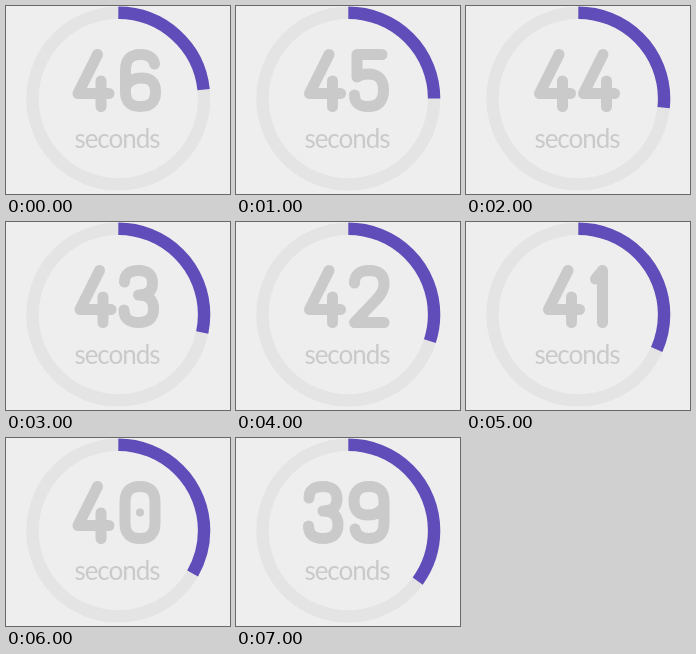
Recreate the animation shown at these times as an HTML page with a canvas. Size 224 by 188 pixels, loop 8000 ms.

```html
<!DOCTYPE html>
<html lang="en">
<head>
<meta charset="utf-8">
<title>Countdown</title>
<style>
  html, body { margin: 0; width: 100%; height: 100%; overflow: hidden; background: #eee; }
  canvas { display: block; }
</style>
</head>
<body>
<canvas id="stage" width="224" height="188" role="img" aria-label="Seconds countdown"></canvas>
<script>
const canvas = document.getElementById('stage');
const ctx = canvas.getContext('2d');

const LOOP = 8000, FIRST = 46;
const CX = 112.3, CY = 92.6, RADIUS = 85.8, RING = 12.4;
const TEXT_CX = 111, TOP = 43, HEIGHT = 63, GAP = 2, PEN = 11;
const INK = '#cacaca', TRACK = '#e4e4e4', ACCENT = '#614dba';

// Rounded numerals: [advance width, centre line of the pen].
const SIX = 'M38 15C37 8 31 5.5 24 5.5Q9 5.5 9 21V43Q9 57.5 24 57.5Q39 57.5 39 43Q39 29 25 29Q13 29 9 38';
const NUMERALS = {
  0: [45, 'M8.5 21Q8.5 5.5 23.5 5.5Q38.5 5.5 38.5 21V42Q38.5 57.5 23.5 57.5Q8.5 57.5 8.5 42Z'],
  1: [24, 'M8.5 14L15.5 5.5V57.5'],
  2: [42, 'M6.5 18Q6.5 5.5 21.5 5.5Q36 5.5 36 19Q36 27 28 35L6.5 57.5H36'],
  3: [41, 'M6 17Q6 5.5 20 5.5Q34 5.5 34 18Q34 30 20 30Q35 30 35 44Q35 57.5 20 57.5Q5.5 57.5 5.5 45'],
  4: [42, 'M25 5.5L5.5 44.5H36.5M28.5 32V57.5'],
  5: [42, 'M34 5.5H9V28Q13 25 20 25Q35.5 25 35.5 41Q35.5 57.5 20 57.5Q6.5 57.5 6.5 46'],
  6: [45, SIX],
  9: [45, SIX, true]
};

function ring(color, turn) {
  const start = -Math.PI / 2;
  ctx.beginPath();
  ctx.arc(CX, CY, RADIUS, start, start + turn * 2 * Math.PI);
  ctx.lineWidth = RING;
  ctx.lineCap = 'butt';
  ctx.strokeStyle = color;
  ctx.stroke();
}

function numeral(digit, x) {
  const [width, path, flipped] = NUMERALS[digit];
  ctx.save();
  ctx.translate(x, TOP);
  if (flipped) {
    ctx.translate(width + GAP, HEIGHT);
    ctx.rotate(Math.PI);
  }
  ctx.lineWidth = PEN;
  ctx.lineCap = ctx.lineJoin = 'round';
  ctx.strokeStyle = ctx.fillStyle = INK;
  ctx.stroke(new Path2D(path));
  if (digit === '0') {
    ctx.beginPath();
    ctx.arc(23.5, HEIGHT / 2, 4, 0, 2 * Math.PI);
    ctx.fill();
  }
  ctx.restore();
}

function drawNumber(value) {
  const digits = [...String(value)];
  const total = digits.reduce((sum, d) => sum + NUMERALS[d][0], GAP * (digits.length - 1));
  let x = TEXT_CX - total / 2;
  for (const d of digits) {
    numeral(d, x);
    x += NUMERALS[d][0] + GAP;
  }
}

function drawLabel() {
  ctx.font = '26px Lato, "Open Sans", sans-serif';
  ctx.letterSpacing = '-1px';
  ctx.textAlign = 'center';
  ctx.fillStyle = INK;
  ctx.fillText('seconds', TEXT_CX, 142);
}

function render(now) {
  const value = FIRST - Math.floor((now % LOOP) / 1000);
  ctx.fillStyle = '#eee';
  ctx.fillRect(0, 0, canvas.width, canvas.height);
  ring(TRACK, 1);
  ring(ACCENT, (60 - value) / 60);
  drawNumber(value);
  drawLabel();
}

function tick() {
  render(performance.now());
  requestAnimationFrame(tick);
}
tick();
</script>
</body>
</html>
```
